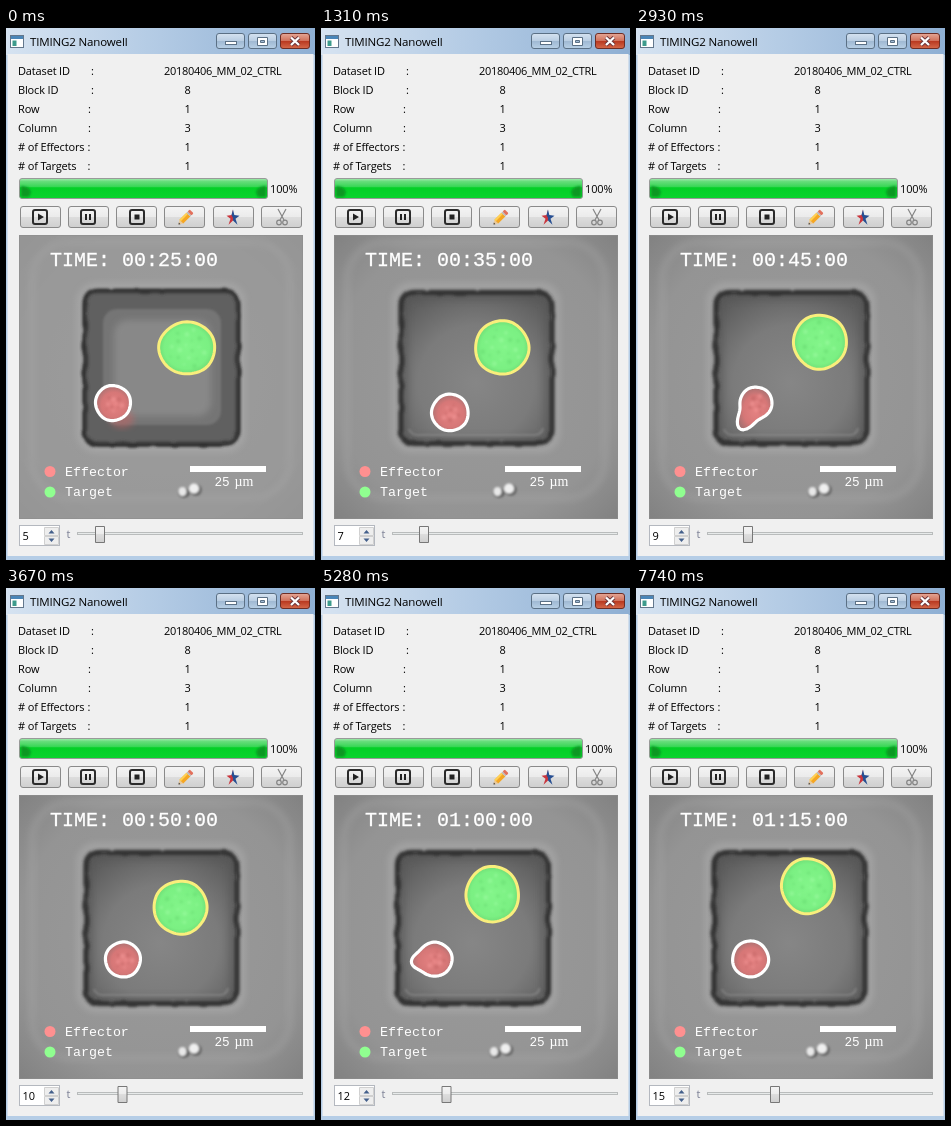
Recreate the animation shown at these times as an HTML page. Size 309 by 532 pixels, loop 8000 ms.

```html
<!DOCTYPE html>
<html lang="en">
<head>
<meta charset="utf-8">
<title>Nanowell viewer</title>
<style>
html, body { margin: 0; width: 100%; height: 100%; overflow: hidden; background: #f0f0f0; }
svg { display: block; width: 100vw; height: 100vh; }
.ui { font: 11px "Open Sans", "Noto Sans", sans-serif; letter-spacing: -.15px; fill: #000; }
.mono { font-family: "Liberation Mono", monospace; fill: #fff; }
</style>
</head>
<body>
<svg viewBox="0 0 309 532">
  <defs>
    <linearGradient id="bar"><stop stop-color="#d6e3f1"/><stop offset=".5" stop-color="#b2cae4"/><stop offset="1" stop-color="#8eafd3"/></linearGradient>
    <linearGradient id="btn" x2="0" y2="1"><stop stop-color="#f4f4f4"/><stop offset=".5" stop-color="#ebebeb"/><stop offset=".5" stop-color="#dddddd"/><stop offset="1" stop-color="#cfcfcf"/></linearGradient>
    <linearGradient id="glass" x2="0" y2="1"><stop stop-color="#d5e2f0"/><stop offset=".5" stop-color="#b9cde2"/><stop offset=".5" stop-color="#9fb8d2"/><stop offset="1" stop-color="#b8d0e6"/></linearGradient>
    <linearGradient id="close" x2="0" y2="1"><stop stop-color="#e5a796"/><stop offset=".5" stop-color="#d0705a"/><stop offset=".5" stop-color="#b8371f"/><stop offset="1" stop-color="#d4694a"/></linearGradient>
    <linearGradient id="green" x2="0" y2="1"><stop stop-color="#a4eab0"/><stop offset=".15" stop-color="#66dd7b"/><stop offset=".42" stop-color="#36d654"/><stop offset=".46" stop-color="#04cf27"/><stop offset="1" stop-color="#0ad42e"/></linearGradient>
    <radialGradient id="field" r=".72"><stop stop-color="#9a9a9a"/><stop offset=".7" stop-color="#949494"/><stop offset="1" stop-color="#808080"/></radialGradient>
    <radialGradient id="floor" cy=".6" r=".7"><stop stop-color="#868686"/><stop offset=".55" stop-color="#7b7b7b"/><stop offset="1" stop-color="#5a5a5a"/></radialGradient>
    <radialGradient id="red" cx=".53" cy=".55" r=".55"><stop stop-color="#e58282"/><stop offset=".65" stop-color="#d67777"/><stop offset="1" stop-color="#a87272"/></radialGradient>
    <radialGradient id="lime"><stop stop-color="#83f58a"/><stop offset=".8" stop-color="#7bf083"/><stop offset="1" stop-color="#70de77"/></radialGradient>
    <filter id="rough" x="-10%" y="-10%" width="120%" height="120%">
      <feTurbulence type="fractalNoise" baseFrequency=".08" numOctaves="1" seed="4"/>
      <feDisplacementMap in="SourceGraphic" scale="4" xChannelSelector="R" yChannelSelector="G"/>
      <feGaussianBlur stdDeviation="1.4"/>
    </filter>
    <filter id="soft" x="-20%" y="-20%" width="140%" height="140%"><feGaussianBlur stdDeviation="3"/></filter>
    <filter id="fuzz" x="-30%" y="-30%" width="160%" height="160%"><feGaussianBlur stdDeviation="1"/></filter>
    <clipPath id="view"><rect x="13" y="207" width="284" height="284"/></clipPath>
  </defs>

  <rect width="309" height="532" fill="#b5cde6"/>
  <rect width="309" height="27" fill="url(#bar)"/>
  <rect x="1.5" y="26" width="306" height="502" fill="#f0f0f0"/>
  <rect x="4.5" y="7.5" width="13" height="12" fill="#fff" stroke="#63778c"/>
  <rect x="5" y="8" width="12" height="3" fill="#4a86b8"/>
  <rect x="6.5" y="12.5" width="4" height="5.5" fill="#3d9b8c"/>
  <text x="24" y="18" class="ui" style="font-size:11.5px">TIMING2 Nanowell</text>
  <g stroke="#5b7085">
    <rect x="210.5" y="5.5" width="28" height="15" rx="2.5" fill="url(#glass)"/>
    <rect x="242.5" y="5.5" width="28" height="15" rx="2.5" fill="url(#glass)"/>
    <rect x="274.5" y="5.5" width="29" height="15" rx="2.5" fill="url(#close)" stroke="#6d2d25"/>
    <rect x="219.5" y="13.5" width="11" height="3" fill="#fff"/>
    <path d="M251.5 9.5h10v8h-10zM254.5 12.5h4v2h-4z" fill="#fff" fill-rule="evenodd"/>
  </g>
  <path d="M285 9.500l8 7.500M293 9.500l-8 7.500" stroke="#69343a" stroke-width="4"/>
  <path d="M285 9.500l8 7.500M293 9.500l-8 7.500" stroke="#fff" stroke-width="2.300"/>

  <g id="info" class="ui"></g>

  <rect x="13.5" y="150.5" width="248" height="20" rx="2.5" fill="url(#green)" stroke="#999"/>
  <g fill="#078f22" opacity=".85" filter="url(#fuzz)"><path d="M15 158q8 0 10 6l-2 5h-8z"/><path d="M260 158q-8 0-10 6l2 5h8z"/></g>
  <text x="264" y="165" class="ui">100%</text>

  <g id="buttons"></g>
  <g fill="none" stroke="#2b2b2b" stroke-width="2">
    <rect x="27" y="182" width="14" height="14" rx="2"/><rect x="75" y="182" width="14" height="14" rx="2"/><rect x="124" y="182" width="14" height="14" rx="2"/>
  </g>
  <path d="M32 185.500l6 3.500-6 3.500zM79 186h2v6h-2zM83 186h2v6h-2zM128.500 186.500h5v5h-5z" fill="#222"/>
  <g transform="translate(172.500 196.500) rotate(-45)">
    <path d="M0 0l4-2.700v5.400z" fill="#eac99a"/><path d="M0 0l1.600-1.100v2.200z" fill="#333"/>
    <rect x="4" y="-2.700" width="10" height="5.400" fill="#f5a623"/><rect x="4" y="-2.700" width="10" height="2" fill="#ffd154"/>
    <rect x="14" y="-2.700" width="1.600" height="5.400" fill="#bbb"/><rect x="15.600" y="-2.700" width="3" height="5.400" rx="1" fill="#e2705c"/>
  </g>
  <path d="M227 181.500l1.300 5.500 5.200.7-4 3 2 6-4.500-4.200z" fill="#274f92"/>
  <path d="M227 181.500l-1.300 5.500-5.200.7 4 3-2 6 4.500-4.200z" fill="#c9363e"/>
  <path d="M227 181.500l-1.500 5.500 1.500 3z" fill="#274f92"/>
  <g fill="none" stroke="#858585" stroke-width="1.200"><path d="M272 181l6 11M280 181l-6 11"/><circle cx="273" cy="194.500" r="2.300"/><circle cx="279" cy="194.500" r="2.300"/></g>

  <g clip-path="url(#view)">
    <rect x="13" y="207" width="284" height="284" fill="url(#field)"/>
    <rect id="haze" x="13" y="207" width="284" height="284" fill="#9b9b9b"/>
    <g id="well">
      <rect x="26" y="214" width="258" height="256" rx="38" fill="none" stroke="#ababab" stroke-width="7" opacity=".3" filter="url(#soft)"/>
      <rect x="74" y="258" width="162" height="163" rx="16" fill="none" stroke="#b4b4b4" stroke-width="6" opacity=".5" filter="url(#soft)"/>
      <g id="sharp">
        <rect x="80" y="265" width="150" height="150" rx="12" fill="url(#floor)"/>
        <rect x="84" y="269" width="142" height="142" rx="9" fill="none" stroke="#565656" stroke-width="6" opacity=".6" filter="url(#soft)"/>
        <path d="M88 401q2 6 9 6h116q8 0 9-7" fill="none" stroke="#999" stroke-width="2" opacity=".5" filter="url(#fuzz)"/>
        <rect x="80" y="264.500" width="151" height="151" rx="13" fill="none" stroke="#333" stroke-width="5" filter="url(#rough)"/>
      </g>
      <g id="blurred">
        <rect x="79" y="263" width="153" height="153" rx="10" fill="#606060"/>
        <rect x="97" y="281" width="118" height="116" rx="14" fill="#747474" filter="url(#fuzz)"/>
        <rect x="108" y="292" width="97" height="96" rx="14" fill="#888" filter="url(#soft)"/>
        <rect x="79" y="263" width="153" height="153" rx="12" fill="none" stroke="#303030" stroke-width="4" filter="url(#rough)"/>
      </g>
      <g filter="url(#fuzz)">
        <ellipse cx="178" cy="465" rx="6" ry="5" fill="#666"/><ellipse cx="190" cy="462" rx="6" ry="6" fill="#6c6c6c"/>
        <ellipse cx="176.500" cy="463.500" rx="4" ry="4.500" fill="#e8e8e8"/><ellipse cx="188" cy="460.500" rx="5" ry="5" fill="#efefef"/>
      </g>
    </g>
    <ellipse id="glow" rx="12" ry="9" fill="#c86464" filter="url(#soft)"/>
    <path id="target" fill="url(#lime)" stroke="#f9ee7c" stroke-width="3"/>
    <g id="spots" opacity=".4" filter="url(#fuzz)"></g>
    <path id="effector" fill="url(#red)" stroke="#fff" stroke-width="3.200" stroke-linejoin="round"/>
    <g id="grains" opacity=".45" filter="url(#fuzz)"></g>
    <text id="clock" x="44" y="238" class="mono" font-size="20" stroke="#fff" stroke-width=".3"></text>
    <circle cx="44" cy="443.500" r="5.500" fill="#ff9090"/><circle cx="44" cy="464" r="5.500" fill="#90ff90"/>
    <text x="59" y="448" class="mono" font-size="13.300">Effector</text>
    <text x="59" y="468" class="mono" font-size="13.300">Target</text>
    <rect x="184" y="438" width="76" height="6" fill="#fff"/>
    <text x="208.500" y="458" class="mono" font-size="12.700">25</text>
    <text x="228.500" y="458" fill="#fff" font-size="14" font-family="Liberation Serif, serif">µm</text>
  </g>
  <rect x="13.500" y="207.500" width="283" height="283" fill="none" stroke="#8e8e8e" opacity=".6"/>

  <rect x="13.500" y="497.500" width="40" height="20" fill="#fff" stroke="#b4b8bf"/>
  <path d="M38.500 499.500h14v8h-14zM38.500 508.500h14v8h-14z" fill="#eee" stroke="#d0d0d0"/>
  <path d="M42.500 505.500l3-3.500 3 3.500zM42.500 510.500l3 3.500 3-3.500z" fill="#44608c"/>
  <text id="count" x="16.500" y="512" class="ui"></text>
  <text x="60.500" y="510" class="ui" style="fill:#7b7f94">t</text>
  <rect x="71.500" y="504.500" width="225" height="2" fill="#e7eaea" stroke="#b9bcbc"/>
  <path id="knob" d="M-4.500 498.500h9v16h-9z" fill="url(#btn)" stroke="#777"/>
</svg>
<script>
const $ = id => document.getElementById(id);
const set = (id, attrs) => { for (const k in attrs) $(id).setAttribute(k, attrs[k]); };

const LOOP = 8000, FIRST = 5;
const STEPS = [440, 1310, 2030, 2930, 3670, 4540, 5280, 6150, 6870, 7740];

// step, target x y rx ry, effector x y r, tail length and angle, well shift, defocus
const POSES = [
  [5, 181, 320, 28, 26, 107, 375, 17.5, 0, 2.1, 0, 1],
  [7, 181, 319.5, 26.7, 26.7, 129, 384.5, 18.3, 0, 2.1, 0, 0],
  [9, 184, 314, 26.5, 27, 120, 375, 16, 14.5, 2.12, 0, 0],
  [10, 174.5, 319.5, 26.5, 26.5, 117, 371.5, 17.5, 0, 2.6, 0, 0],
  [11, 174, 313, 26, 27.5, 113, 376, 16, 14, 3.01, -3, 0],
  [13, 169, 299.5, 26.5, 28, 115, 366.5, 18, 0, 3, -4, 0],
  [15, 172, 298, 26.5, 27.5, 114.5, 371, 18, 0, 3, -2, 0]
];

function poseAt(n) {
  const i = Math.max(1, POSES.findIndex(p => p[0] >= n));
  const a = POSES[i - 1], b = POSES[i], k = (n - a[0]) / (b[0] - a[0]);
  return a.map((v, j) => v + (b[j] - v) * k);
}

// Slightly wobbly oval with an optional pointed tail
function blob(x, y, rx, ry, seed, tail = 0, dir = 0) {
  const pts = [];
  for (let i = 0; i < 72; i++) {
    const a = i * Math.PI / 36;
    const d = Math.atan2(Math.sin(a - dir), Math.cos(a - dir));
    const w = 1 + .008 * Math.sin(3 * a + seed) + .008 * Math.sin(5 * a + 2 * seed);
    const t = tail * Math.exp(-((d / .42) ** 2));
    pts.push((x + Math.cos(a) * (rx * w + t)).toFixed(2) + " " + (y + Math.sin(a) * (ry * w + t)).toFixed(2));
  }
  return "M" + pts.join("L") + "Z";
}

function speckle(id, count, reach, colors) {
  for (let i = 0; i < count; i++) {
    const a = i * 2.4, r = reach * Math.sqrt((i + .5) / count);
    $(id).innerHTML += `<circle cx="${r * Math.cos(a)}" cy="${r * Math.sin(a)}" r="${1.2 + i % 3 * .6}" fill="${colors[i % 2]}"/>`;
  }
}

const pad = v => String(v).padStart(2, "0");
let shown = -1;

function draw(ms) {
  const n = FIRST + STEPS.filter(s => ms % LOOP >= s).length;
  if (n === shown) return;
  shown = n;
  const [, tx, ty, trx, try_, ex, ey, er, tail, dir, shift, defocus] = poseAt(n);
  set("target", { d: blob(tx, ty, trx, try_, n) });
  set("effector", { d: blob(ex, ey, er, er, n * 1.7, tail, dir) });
  set("spots", { transform: `translate(${tx} ${ty}) rotate(${n * 50})` });
  set("grains", { transform: `translate(${ex + 1} ${ey + 1}) rotate(${n * 70})` });
  set("glow", { cx: ex + 9, cy: ey + 16, opacity: .5 * defocus });
  set("well", { transform: `translate(${shift} 0)` });
  set("blurred", { opacity: defocus });
  set("haze", { opacity: .75 * defocus });
  set("knob", { transform: `translate(${94 + 4.5 * (n - FIRST)} 0)` });
  const min = n * 5;
  $("clock").textContent = `TIME: ${pad(Math.floor(min / 60))}:${pad(min % 60)}:00`;
  $("count").textContent = n;
}

const rows = [["Dataset ID", 85, "20180406_MM_02_CTRL"], ["Block ID", 85, 8], ["Row", 82, 1],
  ["Column", 82, 3], ["# of Effectors", 81.5, 1], ["# of Targets", 81.5, 1]];
$("info").innerHTML = rows.map(([label, colon, value], i) => {
  const y = 47 + 19 * i;
  return `<text x="12" y="${y}">${label}</text><text x="${colon}" y="${y}">:</text>` +
    `<text x="${i ? 178.5 : 158}" y="${y}" style="letter-spacing:-.3px">${value}</text>`;
}).join("");
$("buttons").innerHTML = [0, 1, 2, 3, 4, 5].map(i =>
  `<rect x="${Math.floor(14 + 48.3 * i) + .5}" y="178.5" width="40" height="21" rx="2.5" fill="url(#btn)" stroke="#8a8a8a"/>`).join("");
speckle("spots", 18, 20, ["#a8ffab", "#62d46c"]);
speckle("grains", 10, 9, ["#f79c9c", "#bd6060"]);

const start = performance.now();
function tick() {
  draw(performance.now() - start);
  requestAnimationFrame(tick);
}
tick();
</script>
</body>
</html>
```
